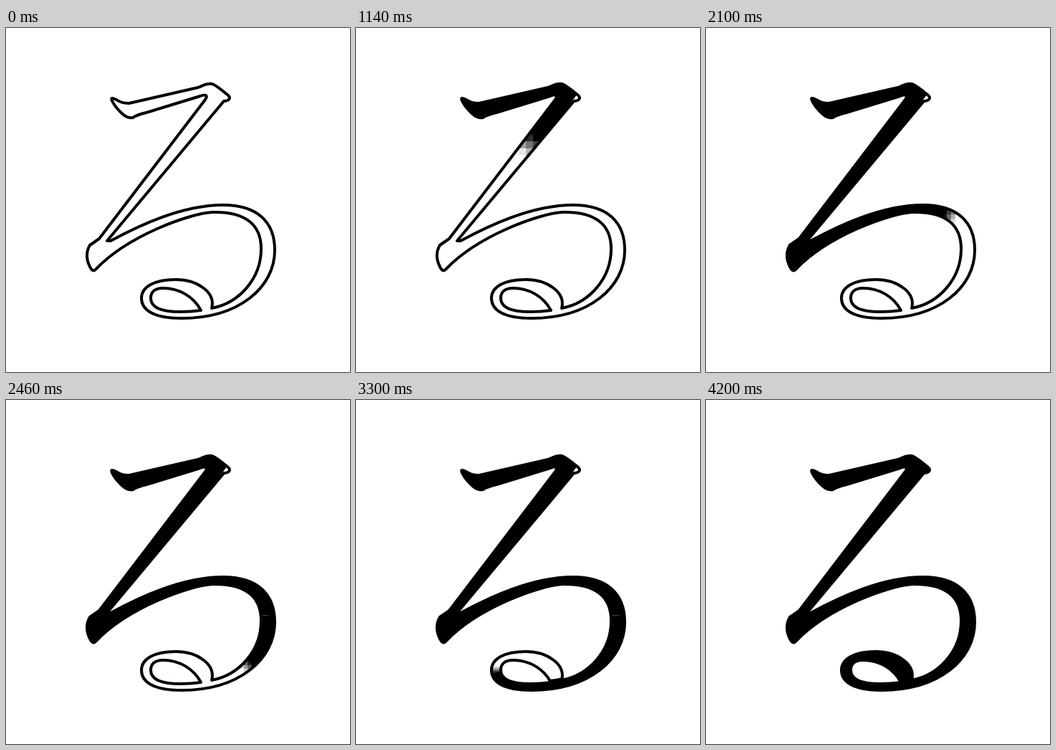
These frames come from a looping animation (480x480 px, 4660 ms). An HTML page with a canvas:

```html
<!DOCTYPE html>
<html lang="ja">
<head>
<meta charset="utf-8">
<title>る</title>
<style>
  html, body { margin: 0; width: 100%; height: 100%; overflow: hidden; background: #fff; }
  canvas { display: block; width: 480px; height: 480px; }
</style>
</head>
<body>
<canvas id="stage" width="480" height="480"></canvas>
<script>
const LOOP = 4660, START = 600, STEP = 60, LEG = 540, DONE = 4200;
const ctx = document.getElementById('stage').getContext('2d');

const glyph = new Path2D(`
  M148 98 C153 97 157 106 172 105 L268 83 C276 80 280 77 287 78
  C291 78 304 89 310 94 C315 98 310 102 304 102 L141 297 H146
  C185 276 245 247 303 247 C350 247 375 270 375 310
  C375 362 325 405 245 405 C205 405 189 393 189 377
  S207 351 237 351 S293 369 287 391
  C325 384 356 350 356 308 C356 275 335 256 288 257
  C255 259 170 290 126 336 Q121 342 117 333
  Q109 317 117 303 Q123 299 130 294
  L278 100 C282 94 279 92 271 95 L196 118
  Q183 121 177 125 C168 127 160 118 154 111 C148 103 146 98 148 98 Z
  M272 394 C262 375 242 363 219 363 C207 363 202 369 202 377
  C202 390 217 396 243 396 Q258 396 272 394 Z`);

// The brush covers one leg of its route every 540 ms
const legs = [
  'M140 88 C152 104 163 115 175 115 L292 88 L238 162',
  'L124 320 Q155 296 185 281.5',
  'C222 264 262 252 296 252 C335 252 364 268 365.5 300',
  'C368 350 332 404 242 400',
  'C212 400 196 392 196 376',
  'C196 364 212 357 242 357',
  'C264 357 281 372 282 390'
];
const WIDE_LEGS = 3, WIDE = 32, NARROW = 18;

const route = document.createElementNS('http://www.w3.org/2000/svg', 'path');
const ends = [0];
for (let i = 1; i <= legs.length; i++) {
  route.setAttribute('d', legs.slice(0, i).join(' '));
  ends.push(route.getTotalLength());
}
const trail = new Path2D(legs.join(' '));
const total = ends[legs.length], turn = ends[WIDE_LEGS];

function travelled(time) {
  const p = (time - START) / LEG, i = Math.floor(p);
  return ends[i] + (ends[i + 1] - ends[i]) * (p - i);
}

function ink(from, to, width) {
  if (to <= from) return;
  ctx.lineWidth = width;
  ctx.setLineDash([to - from, total]);
  ctx.lineDashOffset = -from;
  ctx.stroke(trail);
}

// Blocky fade across the front of the brush
function softTip(dist, fade, reach) {
  const p = route.getPointAtLength(dist), q = route.getPointAtLength(Math.max(0, dist - 1));
  const angle = Math.atan2(p.y - q.y, p.x - q.x);
  const cell = fade / 3, span = fade + reach;
  const first = v => Math.floor((v - span) / cell) * cell;
  for (let y = first(p.y); y < p.y + span; y += cell) {
    for (let x = first(p.x); x < p.x + span; x += cell) {
      const dx = x + cell / 2 - p.x, dy = y + cell / 2 - p.y;
      const along = dx * Math.cos(angle) + dy * Math.sin(angle);
      const across = dy * Math.cos(angle) - dx * Math.sin(angle);
      if (Math.abs(along) > fade || Math.abs(across) > reach) continue;
      ctx.globalAlpha = Math.min(1, Math.max(0, 0.5 - along / fade));
      ctx.fillRect(x, y, cell, cell);
    }
  }
  ctx.globalAlpha = 1;
}

function paint(time) {
  const dist = travelled(time);
  const fade = 40 * Math.exp(-2 * (time - START) / (DONE - START));
  const solid = dist - fade / 2;
  ctx.save();
  ctx.clip(glyph, 'evenodd');
  ctx.lineJoin = 'miter';
  ctx.miterLimit = 20;
  ink(0, Math.min(solid, turn), WIDE);
  ink(turn, solid, NARROW);
  softTip(dist, fade, (dist < turn ? WIDE : NARROW) / 2);
  ctx.restore();
}

function draw(t) {
  ctx.fillStyle = '#fff';
  ctx.fillRect(0, 0, 480, 480);
  ctx.fillStyle = ctx.strokeStyle = '#000';
  if (t >= DONE) ctx.fill(glyph, 'evenodd');
  else if (t >= START) paint(START + Math.floor((t - START) / STEP) * STEP);
  ctx.lineWidth = 4;
  ctx.lineJoin = 'round';
  ctx.stroke(glyph);
}

const origin = performance.now();
function tick() {
  draw((performance.now() - origin) % LOOP);
  requestAnimationFrame(tick);
}
tick();
</script>
</body>
</html>
```
